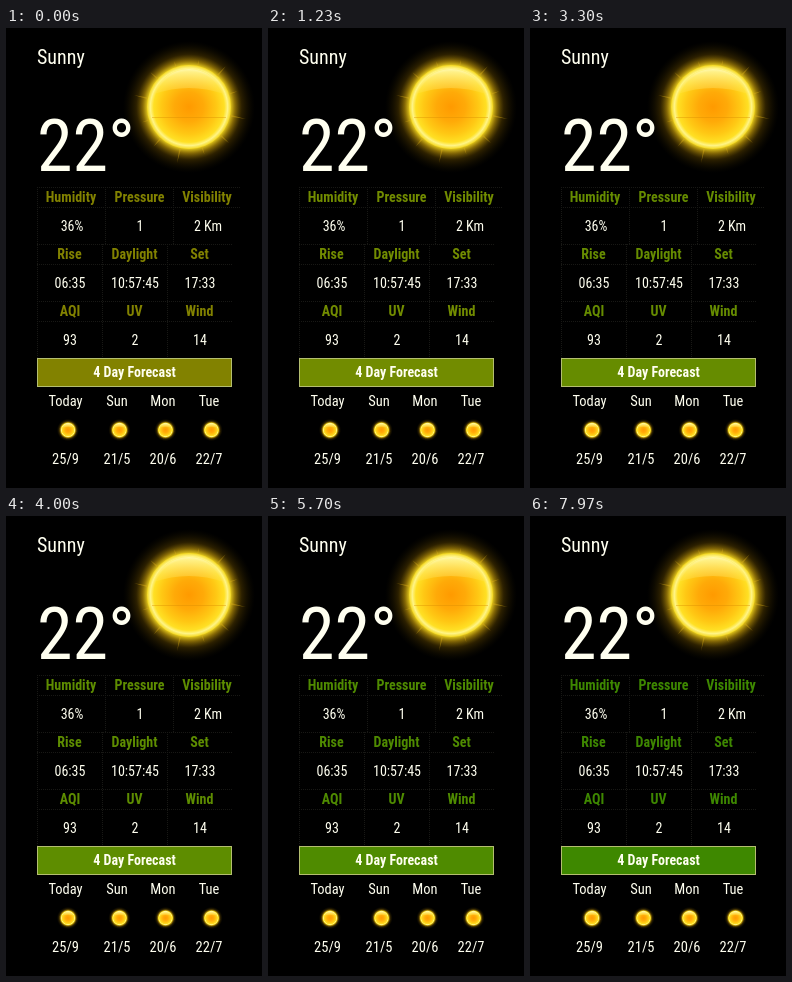
Recreate the animation shown at these times as an HTML page. Size 256x460 px, loop 8000 ms.

```html
<!DOCTYPE html>
<html lang="en">
<head>
<meta charset="utf-8">
<title>Weather panel</title>
<style>
  html, body { margin: 0; width: 100%; height: 100%; overflow: hidden; background: #000; }
  svg { display: block; width: 256px; height: 460px; }
  text { font: 400 14px "Roboto Condensed", Roboto, sans-serif; font-stretch: 75%; fill: ivory; }
  .mid { text-anchor: middle; }
  .label { font-weight: 700; fill: var(--accent); }
  .title { font-weight: 700; }
  .day { font-size: 14.5px; }
  .bar { fill: var(--accent); stroke: #b4be70; }
  .grid { fill: none; stroke: #181815; stroke-dasharray: 1 1; }
</style>
</head>
<body>
<svg id="panel" viewBox="0 0 256 460" xmlns="http://www.w3.org/2000/svg">
  <defs>
    <radialGradient id="disc">
      <stop offset="0" stop-color="#ff9a00"/>
      <stop offset=".35" stop-color="#ffaa08"/>
      <stop offset=".65" stop-color="#ffc814"/>
      <stop offset=".84" stop-color="#ffe024"/>
      <stop offset=".92" stop-color="#fff486"/>
      <stop offset="1" stop-color="#f4d820"/>
    </radialGradient>
    <radialGradient id="glow">
      <stop offset=".62" stop-color="#f4d820"/>
      <stop offset=".7" stop-color="#a88408" stop-opacity=".8"/>
      <stop offset=".8" stop-color="#584000" stop-opacity=".5"/>
      <stop offset="1" stop-color="#201800" stop-opacity="0"/>
    </radialGradient>
    <linearGradient id="shine" x2="0" y2="1">
      <stop offset="0" stop-color="#fffbc0" stop-opacity=".75"/>
      <stop offset="1" stop-color="#ffe050" stop-opacity=".25"/>
    </linearGradient>
    <g id="sun">
      <circle r="66" fill="url(#glow)"/>
      <g id="rays" fill="#d8ac18" opacity=".45"></g>
      <circle r="42" fill="url(#disc)"/>
      <path d="M-35-13A37 37 0 0 1 35-13Q18-19 0-19T-35-13Z" fill="url(#shine)"/>
    </g>
  </defs>
  <use href="#sun" x="183" y="79"/>
  <path d="M146 89.5H220" stroke="#d98c00" stroke-opacity=".4"/>
  <path class="grid" d="M31 159.5H234M31 179.5H234M31 216.5H226M31 236.5H226M31 273.5H226M31 293.5H226
    M31.5 159V330M99.5 159V216M167.5 159V216M96.5 216V330M161.5 216V330"/>
  <text x="31" y="36" style="font-size:20px">Sunny</text>
  <text x="31" y="143" style="font-size:72px">22°</text>
  <rect class="bar" x="31.5" y="330.5" width="194" height="28"/>
  <text class="mid title" x="128.5" y="349">4 Day Forecast</text>
</svg>
<script>
  const panel = document.getElementById("panel");

  function add(parent, tag, attrs, content = "") {
    const node = document.createElementNS(panel.namespaceURI, tag);
    for (const name in attrs) node.setAttribute(name, attrs[name]);
    node.textContent = content;
    parent.append(node);
  }
  const write = (content, x, y, kind = "") =>
    add(panel, "text", { x, y, class: "mid " + kind }, content);

  const rays = document.getElementById("rays");
  for (let i = 0; i < 12; i++) {
    const reach = 48 + (i * 7) % 11;
    add(rays, "path", { d: `M-1-40L0-${reach}L1-40Z`, transform: `rotate(${i * 30 + 12})` });
  }

  const readings = [
    { y: 174, columns: [["Humidity", 65, "36%", 66], ["Pressure", 133.5, "1", 134], ["Visibility", 201, "2 Km", 202]] },
    { y: 231, columns: [["Rise", 63.5, "06:35", 64], ["Daylight", 128.5, "10:57:45", 129], ["Set", 193.5, "17:33", 194]] },
    { y: 288, columns: [["AQI", 64, "93", 64], ["UV", 128.5, "2", 129], ["Wind", 193.5, "14", 194]] }
  ];
  for (const { y, columns } of readings)
    for (const [label, labelX, value, valueX] of columns) {
      write(label, labelX, y, "label");
      write(value, valueX, y + 29);
    }

  const days = [["Today", 59.5, "25/9"], ["Sun", 111, "21/5"], ["Mon", 157, "20/6"], ["Tue", 203, "22/7"]];
  for (const [day, x, range] of days) {
    write(day, x, 378, "day");
    write(range, x, 436, "day");
    add(panel, "use", { href: "#sun", transform: `translate(${x + 2.5} 402) scale(.17)` });
  }

  // Accent drifts from olive to green: [ms, red, green]
  const tones = [[0, 130, 130], [1230, 114, 140], [3300, 102, 140], [4670, 86, 141], [8000, 62, 136]];
  function draw() {
    const time = performance.now() % 8000;
    const i = tones.findIndex(tone => tone[0] > time);
    const [a, b] = [tones[i - 1], tones[i]];
    const part = (time - a[0]) / (b[0] - a[0]);
    const mix = k => Math.round(a[k] + (b[k] - a[k]) * part);
    panel.style.setProperty("--accent", `rgb(${mix(1)},${mix(2)},0)`);
    requestAnimationFrame(draw);
  }
  draw();
</script>
</body>
</html>
```
